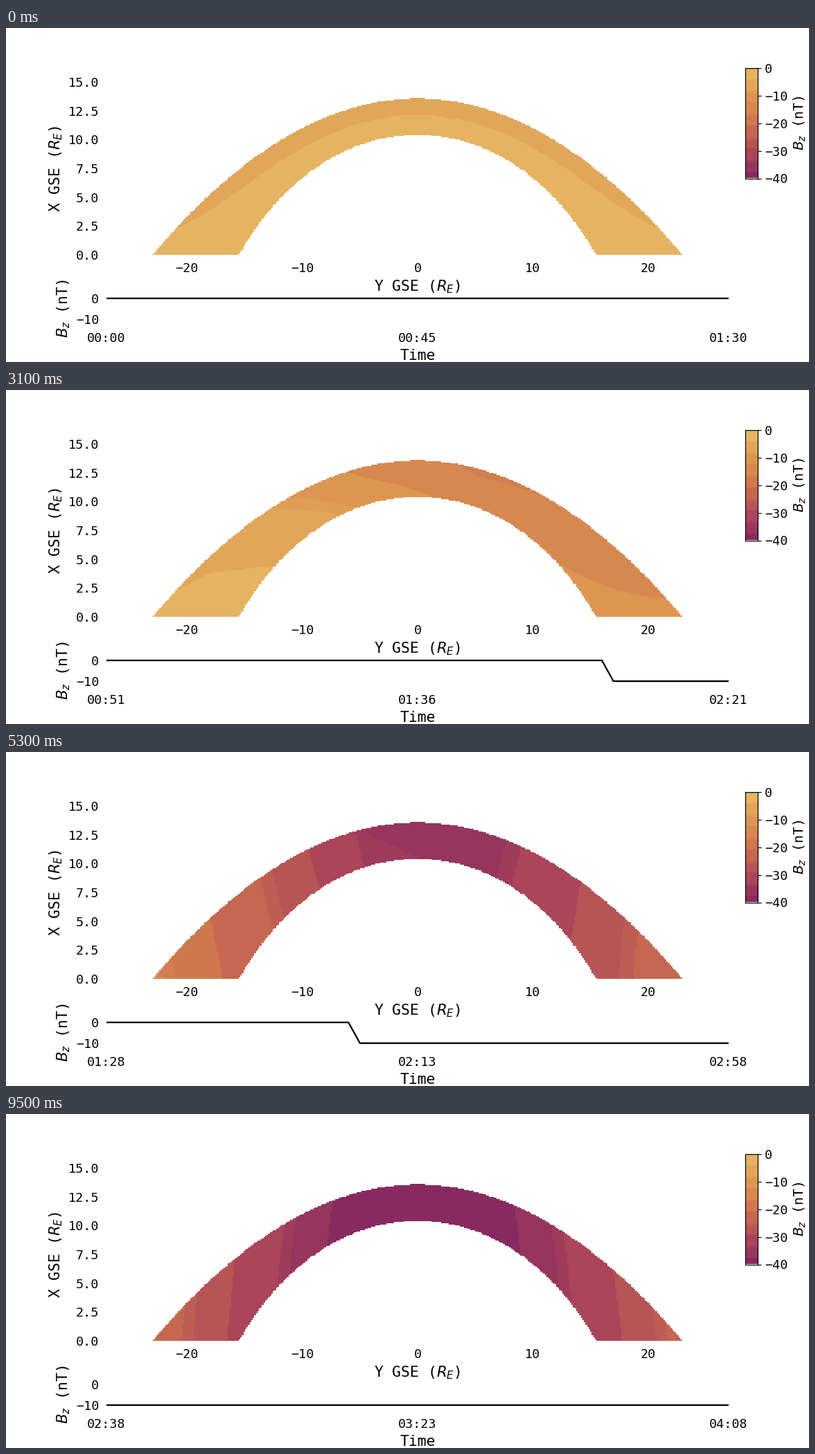
Write a matplotlib script that moves like this. It is 1159 px wide and 483 px high and loops after 9600 ms.

```python
import numpy as np
import matplotlib.pyplot as plt
from matplotlib.animation import FuncAnimation

W, H, DPI = 1159, 483, 100
FRAMES, WINDOW, DROP = 96, 54, 75     # one sample every 100 s
SPREAD, MAX_LAG = 48, 13              # response time and flank delay, in samples
NOSE_IN, FLARE = 10.4, 0.576
NOSE_OUT, FLANK_OUT = 13.56, 23

plt.rcParams.update({
    "font.family": "DejaVu Sans Mono", "font.size": 13.2,
    "axes.labelsize": 15.4, "axes.labelpad": 4.4, "axes.linewidth": 0.88,
    "xtick.major.size": 3.85, "xtick.major.pad": 3.85,
    "ytick.major.size": 3.85, "ytick.major.pad": 3.85,
    "ytick.major.width": 0.88,
})

# Gradient from 0 to -40 nT, cut into bands with a thin one at every second edge
STOPS = np.array([(231, 188, 103), (223, 154, 83), (206, 117, 78),
                  (177, 75, 89), (134, 40, 97)]) / 255
main_edges = 4.2 * np.arange(1, 10)
EDGES = np.sort(np.concatenate([main_edges, main_edges[1::2] + 1]))
limits = np.concatenate([[0], EDGES, [41]])
mids = (limits[:-1] + limits[1:]) / 2
BANDS = np.column_stack([np.interp(mids, np.arange(0, 41, 10), c)
                         for c in STOPS.T])


def colour(strength):
    return BANDS[np.digitize(strength, EDGES)]


# Grid and the region between the two boundary curves
gy, gx = np.meshgrid(np.linspace(-27, 27, 401)[:-1] + 27 / 400,
                     np.linspace(15, 0, 151)[:-1] - 0.05)
radius, theta = np.hypot(gy, gx), np.arctan2(gy, gx)
cos, sin = np.cos(theta), np.sin(theta)
bend = NOSE_OUT / FLANK_OUT ** 2
r_in = NOSE_IN * (2 / (1 + cos)) ** FLARE
r_out = 2 * NOSE_OUT / (cos + np.sqrt(cos ** 2 + 4 * bend * NOSE_OUT * sin ** 2))
depth = (radius - r_in) / (r_out - r_in)
inside = (depth >= 0) & (depth <= 1)

# Quiet and settled strength of the field, and how late each place responds
quiet = 2.4 + 3.3 * depth - 1.5 * (gy / 21) ** 4
settled = np.minimum(41, 47.7 - 1.06 * (np.abs(gy - 0.5) + 0.12 * gx))
lag = MAX_LAG * np.clip((23 - gy - gx) / 46, 0, 1) ** 0.8


def arc_image(i):
    seen = min(i, DROP) + WINDOW - DROP + 1   # samples since the drop came in
    progress = 1 - (1 - np.clip((seen - lag) / SPREAD, 0, 1)) ** 2
    strength = quiet + (settled - quiet) * progress
    return np.dstack([colour(strength), inside.astype(float)])


def clock(minutes):
    return f"{minutes // 60:02d}:{minutes % 60:02d}"


fig = plt.figure(figsize=(W / DPI, H / DPI), dpi=DPI, facecolor="white")


def add_axes(left, top, right, bottom):
    return fig.add_axes([left / W, 1 - bottom / H,
                         (right - left) / W, (bottom - top) / H])


def bare(ax):
    ax.patch.set_visible(False)
    ax.spines[:].set_visible(False)
    ax.tick_params(color="none")


# Arc
sky = add_axes(145, 78, 1043, 328)
bare(sky)
arc = sky.imshow(arc_image(0), extent=(-27, 27, 0, 15), aspect="auto",
                 interpolation="nearest")
sky.set_xticks(range(-20, 21, 10))
sky.set_yticks(np.arange(0, 15.1, 2.5))
sky.set_xlabel("Y GSE ($R_E$)")
sky.set_ylabel("X GSE ($R_E$)")

# Colour bar
bar = add_axes(1066.5, 58, 1084.5, 217.5)
shades = colour((np.arange(320) + 0.5) / 8)[:, None, :]
bar.imshow(shades, extent=(0, 1, -40, 0), aspect="auto", interpolation="nearest")
bar.yaxis.tick_right()
bar.yaxis.set_label_position("right")
bar.set_xticks([])
bar.set_yticks(range(-40, 1, 10))
bar.set_ylabel("$B_z$ (nT)", fontsize=14.3)

# Time series
series = add_axes(145, 382, 1043, 429.5)
bare(series)
samples = np.arange(WINDOW + 1)
line, = series.plot(samples, 0 * samples, color="black", lw=1.65)
series.set_xlim(0, WINDOW)
series.set_ylim(-12.8, 3)
series.set_xticks([0, WINDOW // 2, WINDOW])
series.set_yticks([-10, 0])
series.set_xlabel("Time")
series.set_ylabel("$B_z$ (nT)")


def update(i):
    arc.set_data(arc_image(i))
    line.set_ydata(np.where(samples + i < DROP, 0, -10))
    start = i * 5 // 3
    series.set_xticklabels([clock(start + m) for m in (0, 45, 90)])
    return arc, line


anim = FuncAnimation(fig, update, frames=FRAMES, interval=100, repeat=True,
                     repeat_delay=0, blit=False)
plt.show()
```
